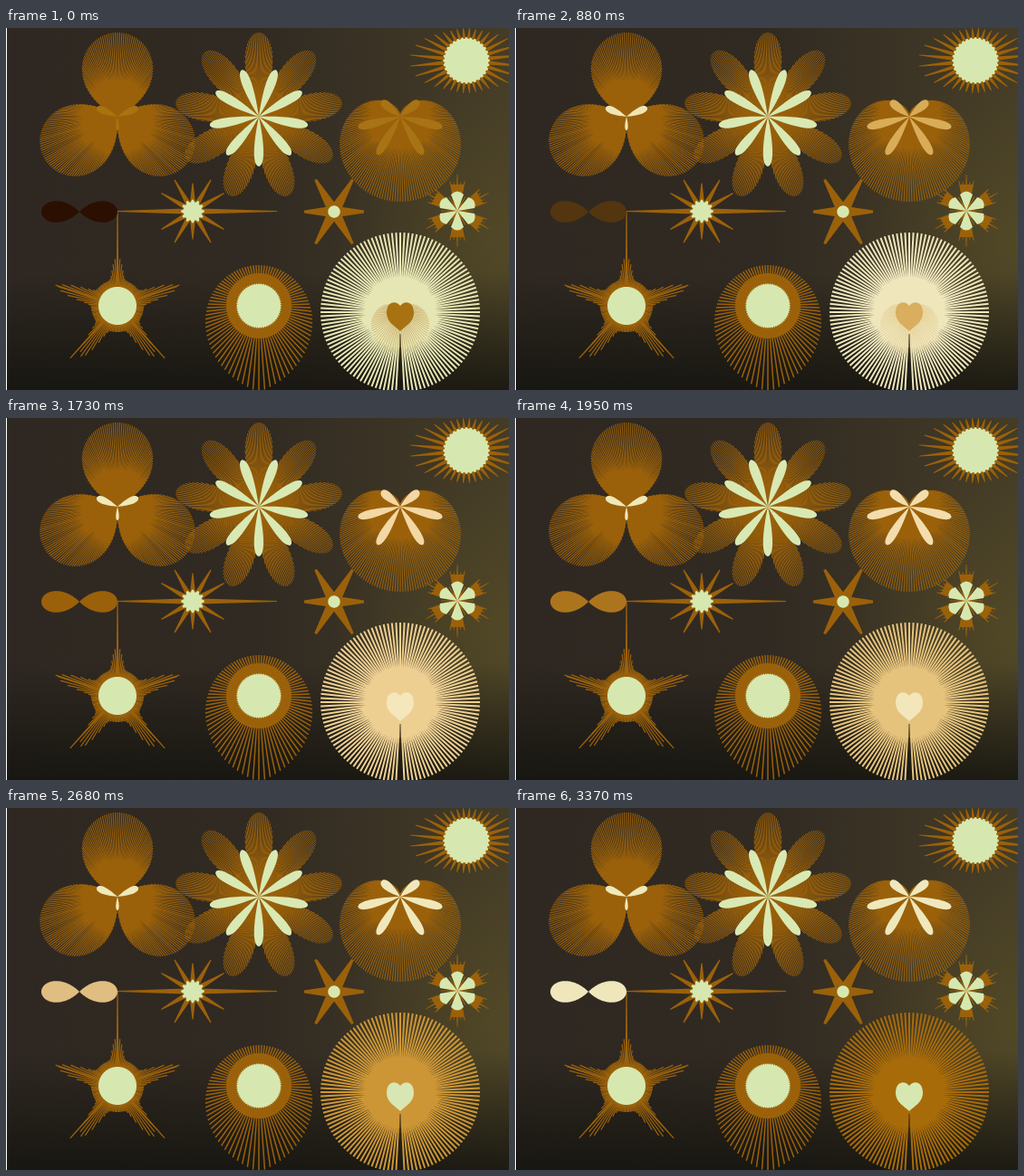
These frames come from a looping animation (555 by 400 pixels, 4030 ms). An HTML page with a canvas:

```html
<!DOCTYPE html>
<html lang="en">
<head>
<meta charset="utf-8">
<title>Polar flowers</title>
<style>
html, body { margin: 0; width: 100%; height: 100%; overflow: hidden; background: #2e2821; }
canvas { display: block; }
</style>
</head>
<body>
<canvas id="stage" width="555" height="400"></canvas>
<script>
const W = 555, H = 400, TAU = Math.PI * 2, RAD = Math.PI / 180;
const BROWN = '#9b610a', LIME = '#d6e8b0';
const { sin, cos, abs, pow, PI } = Math;

const screen = document.getElementById('stage').getContext('2d');
const still = document.createElement('canvas');
still.width = W;
still.height = H;
const g = still.getContext('2d');

// Angles run clockwise from straight up; "side" is an offset across the ray.
const at = ([x, y], a, r, side = 0) =>
  [x + r * sin(a) + side * cos(a), y - r * cos(a) + side * sin(a)];

function rays(c, n, length, start = 0) {
  const p = new Path2D();
  for (let i = 0; i < n; i++) {
    const a = i * TAU / n;
    p.moveTo(...at(c, a, start));
    p.lineTo(...at(c, a, length(a)));
  }
  return p;
}

function curve(c, length, from = 0, to = TAU, p = new Path2D()) {
  const n = 240;
  for (let i = 0; i <= n; i++) {
    const a = from + (to - from) * i / n;
    const q = at(c, a, length(a));
    if (i) p.lineTo(...q); else p.moveTo(...q);
  }
  p.closePath();
  return p;
}

function leaf(p, c, a, len, w) {
  p.moveTo(...c);
  p.bezierCurveTo(...at(c, a, len * .3, -w * .6), ...at(c, a, len * .97, -w * 1.6), ...at(c, a, len));
  p.bezierCurveTo(...at(c, a, len * .97, w * 1.6), ...at(c, a, len * .3, w * .6), ...c);
}

function spike(p, c, a, len, base, tip = .5, start = 0) {
  p.moveTo(...at(c, a, start, -base));
  p.lineTo(...at(c, a, len, -tip));
  p.lineTo(...at(c, a, len, tip));
  p.lineTo(...at(c, a, start, base));
  p.closePath();
}

function fill(p, color) { g.fillStyle = color; g.fill(p); }
function stroke(p, width, color = BROWN) {
  g.strokeStyle = color;
  g.lineWidth = width;
  g.stroke(p);
}
const disk = (c, r) => curve(c, () => r);
const toothed = (c, r, depth, n) => curve(c, a => r + depth * cos(n * a));

function backdrop() {
  const across = g.createLinearGradient(0, 0, W, 0);
  across.addColorStop(0, '#2f2822');
  across.addColorStop(.5, '#312a22');
  across.addColorStop(1, '#443c27');
  g.fillStyle = across;
  g.fillRect(0, 0, W, H);
  const glow = g.createRadialGradient(560, 235, 10, 560, 235, 200);
  glow.addColorStop(0, 'rgba(90,80,38,.6)');
  glow.addColorStop(1, 'rgba(90,80,38,0)');
  g.fillStyle = glow;
  g.fillRect(0, 0, W, H);
  const floor = g.createLinearGradient(0, 270, 0, H);
  floor.addColorStop(0, 'rgba(18,18,13,0)');
  floor.addColorStop(1, 'rgba(18,18,13,.8)');
  g.fillStyle = floor;
  g.fillRect(0, 270, W, H - 270);
  g.fillStyle = '#fff';
  g.fillRect(0, 0, 1, H);
}

function trefoil(c) {
  stroke(rays(c, 240, a => 93 * pow(abs(cos(1.5 * a)), .63)), 1.05);
}

function ninePetals(c) {
  stroke(rays(c, 288, a => 93 * pow(abs(cos(4.5 * a)), .5)), 1);
  const p = new Path2D();
  for (let i = 0; i < 9; i++) leaf(p, c, (20 + 40 * i) * RAD, 55, 6);
  fill(p, '#d9e9b3');
}

function fan(c) {
  stroke(rays(c, 200, a => 94 * pow(abs(sin(a / 2)), 1.42)), 1.1);
}

function sun(c) {
  const p = new Path2D();
  for (let i = 0; i < 32; i++) {
    const a = (i + .5) * TAU / 32;
    spike(p, c, a, 36 + 27 * pow(abs(sin(a)), 4), 2.3, .45, 22);
  }
  fill(p, BROWN);
  fill(toothed(c, 25, 1, 32), LIME);
}

function compass(c) {
  const p = new Path2D();
  for (let i = 0; i < 12; i++) {
    const len = i === 3 ? 93 : i === 9 ? 83 : i % 6 ? 42 - (i % 3 === 2 || i % 3 === 1 ? 2 : 0) : 31;
    spike(p, c, i * 30 * RAD, len, 3, .6, 9);
  }
  fill(p, BROWN);
  fill(toothed(c, 11.5, 1.5, 12), LIME);
}

function sixStar(c) {
  const p = new Path2D();
  for (let i = 0; i < 6; i++) {
    spike(p, c, (30 + 60 * i) * RAD, i % 3 === 1 ? 33 : 41, 6.5, 1.4);
  }
  fill(p, BROWN);
  fill(disk(c, 6.7), LIME);
}

function crownFlower(c) {
  const crown = new Path2D(), petals = new Path2D();
  for (let i = 0; i < 6; i++) {
    const a = i * 60 * RAD;
    spike(crown, c, a, 29, 2, 7.5);
    for (let k = -2; k <= 2; k++) {
      spike(crown, c, a + k * 7 * RAD, [40, 32, 34][abs(k)], 1.2, .4, 20);
    }
    petals.moveTo(...c);
    petals.lineTo(...at(c, a, 18, -7));
    petals.quadraticCurveTo(...at(c, a, 25, 0), ...at(c, a, 18, 7));
    petals.closePath();
    spike(crown, c, a + 30 * RAD, 18, .8);
  }
  fill(crown, BROWN);
  fill(petals, LIME);
}

function combStar(c) {
  stroke(rays(c, 120, a => 29 + (abs(cos(a / 2)) > .93 ? 25 : 40) * pow(abs(cos(2.5 * a)), 11)), 1.2);
  const tips = new Path2D();
  for (const [deg, len] of [[0, 104], [71.5, 72], [138, 78], [222, 78], [288.5, 72]]) {
    spike(tips, c, deg * RAD, len, 1.5, .6);
  }
  fill(tips, BROWN);
  fill(disk(c, 21), LIME);
}

function drop(c) {
  const edge = a => 45 + 50 * pow(1 - abs(a - PI) / PI, 2.1);
  stroke(rays(c, 90, edge), 1.5);
  fill(disk(c, 36), BROWN);
  fill(toothed(c, 24.3, .7, 60), LIME);
}

backdrop();
trefoil([123, 98]);
ninePetals([279, 98]);
fan([435, 98]);
sun([508, 36]);
compass([206, 202.5]);
sixStar([362, 203]);
crownFlower([498, 202]);
combStar([123, 307]);
drop([279, 307]);

// Shapes whose colour changes
const bow = new Path2D();
for (const mid of [PI / 2, PI * 1.5]) {
  curve([81, 203], a => 42 * pow(abs(cos(2 * (a - mid))), .92), mid - PI / 4, mid + PI / 4, bow);
}

const heartMid = [435, 314];
const burst = rays(heartMid, 120, a => abs(a - PI) < .01 ? 26 : 88);
const core = disk(heartMid, 39);
const veil = rays(heartMid, 90, a => 45 * pow(abs(sin(a / 2)), 1.4));
const heart = new Path2D(
  'M435 307C431 301 420 301 420 315C420 325 430 330 435 335C440 330 450 325 450 315C450 301 439 301 435 307Z');
const stem = new Path2D('M434.6 338L435.4 338L436 365H434Z');

const trio = new Path2D();
for (const [deg, len, w] of [[-66, 25, 4.6], [66, 25, 4.6], [180, 15, 2]]) {
  leaf(trio, [123, 98], deg * RAD, len, w);
}
const blades = new Path2D();
for (const [deg, len, w] of [[31, 49, 5.4], [76, 48, 5.4], [130, 27, 5.4]]) {
  for (const s of [-1, 1]) leaf(blades, [435, 98], PI + s * deg * RAD, len, w);
}

// Colours at the key times
const KEYS = [0, 880, 1280, 1730, 2300, 2680, 3370];
const FADES = {
  bow:    '2b0f00 53360f 7d4a05 9a610a c8963a e0bd80 efe6bc',
  burst:  'e6e6b4 efe6bc f5e6bb eecf92 d9b05a cc9636 a86b0a',
  veil:   'd0b878 e6d29a f1daa4 eecf92 d9b05a cc9636 a86b0a',
  heart:  'a87212 d9ae5e eecf90 f5e6bb efe6bc d8e6b4 d6e8b0',
  blades: 'a87314 d9ac58 eac47c f3d7a4 f2e6ba f0e8bb efe8bc',
  trio:   'a87310 efe6b6 efe8b8 efe8b8 efe8b8 efe8b8 efe8b8'
};
for (const k in FADES) {
  FADES[k] = FADES[k].split(' ').map(h => [0, 2, 4].map(i => parseInt(h.substr(i, 2), 16)));
}

const LOOP = 4030;
const STEPS = [0, 160, 270, 390, 500, 620, 750, 880, 980, 1080, 1180, 1280, 1380, 1440, 1500,
  1570, 1730, 1790, 1950, 2050, 2140, 2300, 2330, 2490, 2520, 2680, 2780, 2860, 2950, 3030,
  3110, 3270, 3370];

function tint(name, t) {
  const i = Math.min(KEYS.length - 2, KEYS.findLastIndex(k => k <= t));
  const u = (t - KEYS[i]) / (KEYS[i + 1] - KEYS[i]);
  const [a, b] = [FADES[name][i], FADES[name][i + 1]];
  return `rgb(${a.map((v, k) => Math.round(v + (b[k] - v) * u))})`;
}

function paint(t) {
  const s = screen;
  s.drawImage(still, 0, 0);
  const put = (p, color) => { s.fillStyle = color; s.fill(p); };
  put(bow, tint('bow', t));
  put(trio, tint('trio', t));
  put(blades, tint('blades', t));
  s.strokeStyle = tint('burst', t);
  s.lineWidth = 2;
  s.stroke(burst);
  put(core, tint('burst', t));
  s.strokeStyle = tint('veil', t);
  s.lineWidth = 1;
  s.stroke(veil);
  put(stem, '#33240f');
  put(heart, tint('heart', t));
}

const born = performance.now();
let shown = -1;
function tick() {
  const now = (performance.now() - born) % LOOP;
  const step = STEPS.findLast(k => k <= now);
  if (step !== shown) paint(shown = step);
  requestAnimationFrame(tick);
}
tick();
</script>
</body>
</html>
```
